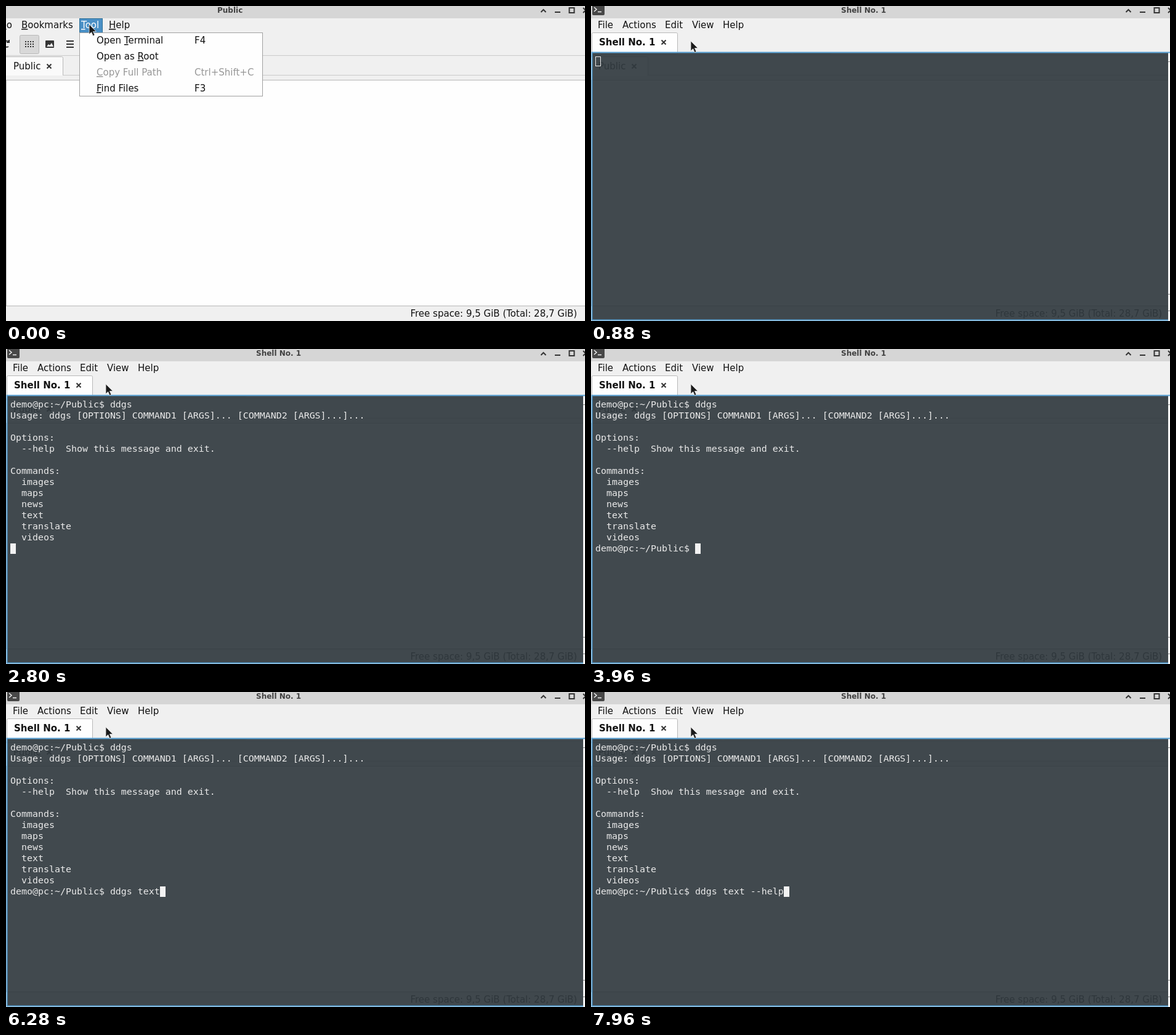
Write an HTML page that moves like this. It is 940 px wide and 512 px high and loops after 8000 ms.

```html
<!DOCTYPE html>
<html lang="en">
<head>
<meta charset="utf-8">
<title>Shell session</title>
<style>
  html, body { margin: 0; width: 100%; height: 100%; overflow: hidden; background: #f0f0f0; }
  svg { display: block; width: 940px; height: 512px; }
  text { font: 15px "DejaVu Sans", sans-serif; fill: #121212; white-space: pre; }
  .title { font-size: 12px; font-weight: bold; fill: #414141; }
  .bold { font-weight: bold; }
  .dim { fill: #979797; }
  .lit { fill: #fff; }
  .mono { font: 14.95px "DejaVu Sans Mono", monospace; fill: #ebebeb; }
  .u { text-decoration: underline; text-decoration-thickness: 1px; }
</style>
</head>
<body>
<svg id="stage" viewBox="0 0 940 512"></svg>
<script>
const LOOP = 8000;
const BAR = '#f0f0f0', PAPER = '#fefefe', EDGE = '#b8b8b8', PRESSED = '#d8d8d8', INK = '#343434', BLUE = '#4a90c6';

const rect = (x, y, w, h, fill, more = '') =>
  `<rect x="${x}" y="${y}" width="${w}" height="${h}" fill="${fill}" ${more}/>`;
const box = (x, y, w, h, fill, stroke = EDGE, r = 0) =>
  rect(x + .5, y + .5, w - 1, h - 1, fill, `stroke="${stroke}" rx="${r}"`);
const line = (d, stroke = EDGE, w = 1) =>
  `<path d="${d}" fill="none" stroke="${stroke}" stroke-width="${w}"/>`;
const group = (id, body) => `<g id="${id}">${body}</g>`;
const cross = (x, y) => line(`M${x} ${y}l7 7m0-7l-7 7`, INK, 2);

// An underscore marks the letter to underline.
const text = (x, y, s, cls = '') =>
  `<text x="${x}" y="${y}" class="${cls}">${s.replace(/_(.)/, '<tspan class="u">$1</tspan>')}</text>`;

function toolbar() {
  let s = line('M5 58A5 5 0 1 0 4 66M5 55v4h-4', INK, 2);
  s += box(22, 47, 32, 31, PRESSED, EDGE, 2);
  for (let i = 0; i < 12; i++) s += rect(31 + i % 4 * 4, 57 + (i >> 2) * 4, 2, 2, INK);
  s += rect(64, 56, 14, 12, INK, 'rx="1"') + `<path d="M66 66l3-4 2 2 3-4 3 6z" fill="${BAR}"/>`;
  for (const y of [57, 62, 67])
    s += line(`M98 ${y}h12M131 ${y}h2M135 ${y}h10`, INK, 2);
  const crumbs = [[161, 54, '/', 190], [214, 62, 'home', 223], [275, 53, 'demo', 280], [327, 64, 'Public', 336]];
  crumbs.forEach(([x, w, name, tx], i) => {
    s += box(x, 47, w, 31, i === 3 ? PRESSED : '#f7f7f7', EDGE, 2) + text(tx, 68, name);
  });
  return s + rect(168, 52, 16, 20, '#858585') +
    '<circle cx="176" cy="61" r="4.5" fill="#b0b0b0" stroke="#505050" stroke-width="2"/>';
}

function fileManager() {
  return rect(0, 0, 940, 512, BAR) +
    text(-11, 36, '_Go') + text(25, 36, '_Bookmarks') + text(122, 36, '_Tool') + text(167, 36, '_Help') +
    toolbar() + line('M0 80.5H940M92 112.5H940', '#cbcbcb') +
    box(-4, 82, 97, 33, '#fafafa', EDGE, 2) + rect(0, 113, 940, 8, BAR) +
    text(12, 103, 'Public') + cross(66.5, 94.5) +
    box(0, 120, 945, 368, PAPER) + text(656.5, 505, 'Free space: 9,5 GiB (Total: 28,7 GiB)');
}

function popup() {
  const items = [['Open _Terminal', 'F4'], ['Open as _Root', ''], ['_Copy Full Path', 'Ctrl+Shift+C'], ['_Find Files', 'F3']];
  const row = (i, cls) => text(147, 61 + i * 26, items[i][0], cls) + text(306, 61 + i * 26, items[i][1], cls);
  return box(119, 20, 38, 24, BLUE, '#2f7198') + text(122, 36, '_Tool', 'lit') +
    box(119, 43, 298, 104, PAPER, '#a0a0a0') +
    items.map((_, i) => row(i, i === 2 ? 'dim' : '')).join('') +
    group('hover', rect(120, 44, 296, 25, BLUE) + row(0, 'lit'));
}

function terminal() {
  const menus = [['File', 11], ['Actions', 51], ['Edit', 120], ['View', 164], ['Help', 214]];
  return rect(0, 20, 940, 56, BAR) + menus.map(([s, x]) => text(x, 36, s)).join('') +
    box(1, 43, 140, 36, PAPER, EDGE, 2) + text(13, 64, 'Shell No. 1', 'bold') + cross(114.5, 55.5) +
    rect(2, 76, 935, 434, '#313a3f', 'opacity=".92"') +
    rect(937, 76, 3, 436, '#f8f8f8') + line('M937 90.5h3m-3 378h3m-3 27h3', '#888') +
    rect(0, 511, 940, 1, BAR) + line('M940 75.5H1.5V510.5H937', '#5ba3d6', 2) +
    group('screen', '') + '<rect id="caret"/>';
}

function titleBar() {
  return rect(0, 0, 940, 20, '#d6d6d6') +
    group('fmTitle', text(343, 11, 'Public', 'title')) +
    group('shTitle', text(406, 11, 'Shell No. 1', 'title') + rect(2, -4, 20, 19, '#484848', 'rx="2"') +
      line('M5 2l4 3.5-4 3.5M11 9.5h6', '#f0f0f0', 1.5)) +
    line('M868.5 10l4-4 4 4M891 10h9M914.5 3h8v8h-8zM937 3l8 8m0-8l-8 8', INK, 2);
}

const stage = document.getElementById('stage');
stage.innerHTML = fileManager() + group('popup', popup()) + group('terminal', terminal()) + titleBar() +
  '<path id="mouse" d="M0 0v16l3.7-3.5 2.6 6 2.7-1.2-2.6-5.8h5z" fill="#1a1a1a" stroke="#e6e6e6" stroke-width=".8"/>';

const el = id => document.getElementById(id);
const show = (id, on) => el(id).setAttribute('display', on ? 'inline' : 'none');
const set = (node, attrs) => { for (const k in attrs) node.setAttribute(k, attrs[k]); };

const PROMPT = 'demo@pc:~/Public$ ';
const USAGE = ['Usage: ddgs [OPTIONS] COMMAND1 [ARGS]... [COMMAND2 [ARGS]...]...', '', 'Options:',
  '  --help  Show this message and exit.', '', 'Commands:',
  ...['images', 'maps', 'news', 'text', 'translate', 'videos'].map(s => '  ' + s)];

// Each word is typed at a steady pace from its start time.
const FIRST = [['ddgs', 1720, 210]];
const SECOND = [['ddgs ', 4240, 210], ['text', 5340, 240], [' --help', 6320, 240]];
const typed = (words, t) => words.map(([s, from, step]) =>
  s.slice(0, Math.max(0, Math.floor((t - from) / step) + 1))).join('');

function linesAt(t) {
  if (t < 1200) return [''];
  const lines = [PROMPT + typed(FIRST, t)];
  if (t >= 2560) lines.push(...(t >= 2780 ? USAGE : []), t >= 2920 ? PROMPT + typed(SECOND, t) : '');
  return lines;
}

let shown = '';
function draw(t) {
  const p = Math.min(1, Math.max(0, (t - 40) / 400));
  const ease = p * p * (3 - 2 * p);
  const my = 30 + 27 * ease;
  set(el('mouse'), { transform: `translate(${135 + 27 * ease} ${my})` });

  show('popup', t < 560);
  show('hover', my > 44);
  show('fmTitle', t < 840);
  show('shTitle', t >= 840);
  show('terminal', t >= 880);

  const lines = linesAt(t);
  const key = lines.join('\n');
  if (key !== shown) {
    el('screen').innerHTML = lines.map((s, i) => text(7, 95 + i * 18, s, 'mono')).join('');
    shown = key;
  }
  const row = lines.length - 1, x = 7 + lines[row].length * 9, y = 82 + row * 18;
  set(el('caret'), t < 1000
    ? { x: x + .5, y: y + .5, width: 8, height: 15, fill: 'none', stroke: '#ebebeb' }
    : { x, y, width: 9, height: 17, fill: '#f2f2f2', stroke: 'none' });
}

const start = performance.now();
function tick() {
  draw((performance.now() - start) % LOOP);
  requestAnimationFrame(tick);
}
tick();
</script>
</body>
</html>
```
